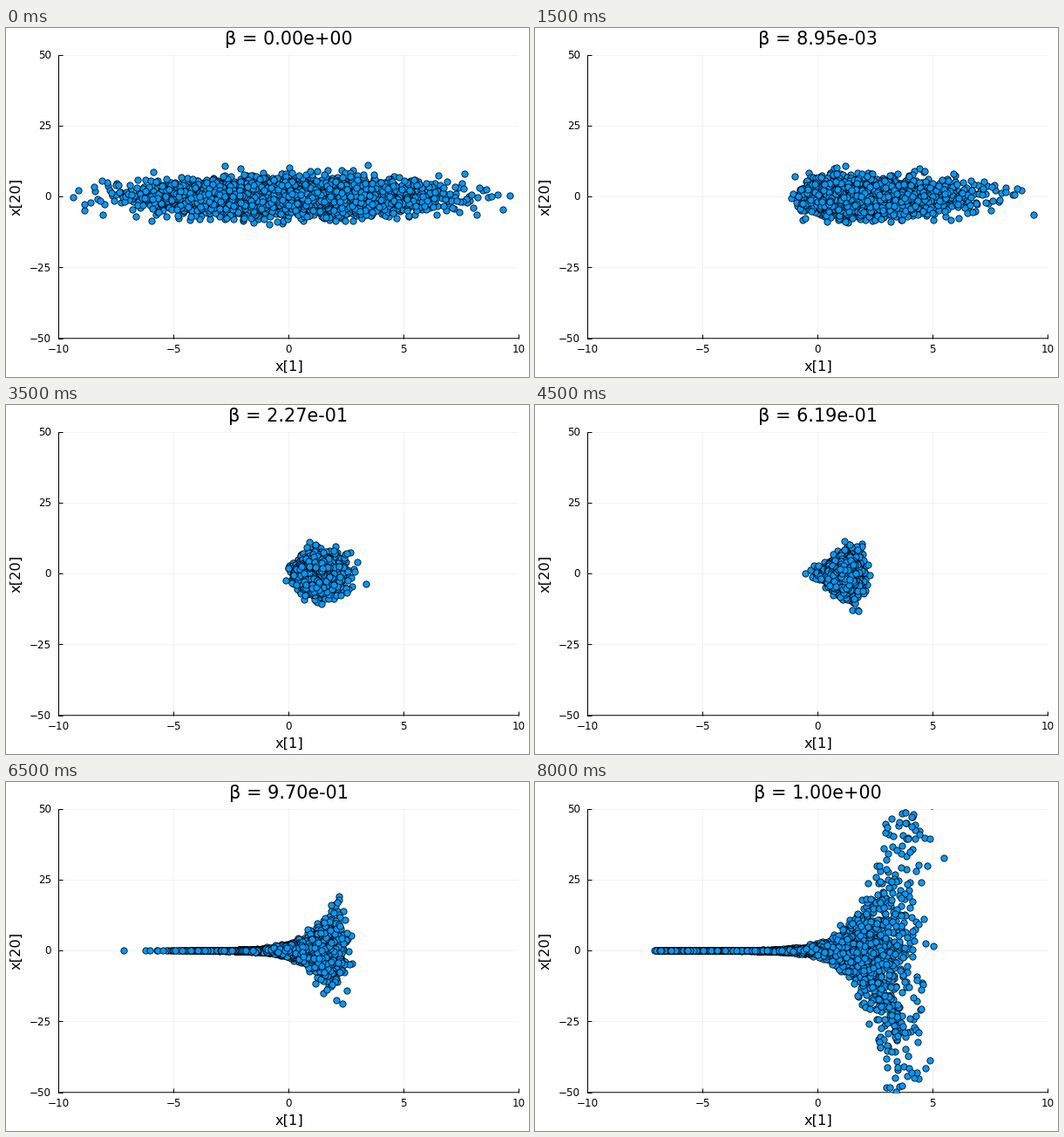
A matplotlib script that plays this animation: 600 by 400 pixels, repeating every 8.5 s.

```python
import numpy as np
import matplotlib.pyplot as plt
from matplotlib.animation import FuncAnimation

W, H, DPI = 600, 400, 100
PX = 72 / DPI
LEFT, RIGHT, TOP, BOTTOM = 60.3, 588.3, 30.6, 355.75
BLUE = "#009AFA"
FRAMES, COUNT, DIM, SIGMA = 17, 3500, 20, 3

# Key points of the annealing schedule, joined by straight lines in logit.
KEY_STEPS = [1, 3, 5, 7, 11, 13, 15, 16]
KEY_BETAS = np.array([1e-4, 8.95e-3, 5.96e-2, 0.227, 0.9, 0.97, 0.994, 0.99997])


def beta_at(step):
    if step == 0:
        return 0.0
    logit = np.interp(step, KEY_STEPS, np.log(KEY_BETAS / (1 - KEY_BETAS)))
    return 1 / (1 + np.exp(-logit))


def precision(x, beta):
    """Precision of x[20] given x[1], between a Gaussian and a funnel."""
    return (1 - beta) / SIGMA**2 + beta * np.exp(-2 * x)


def sample(step):
    """Draw x[1] by inverting its marginal, then x[20] given x[1]."""
    beta = beta_at(step)
    rng = np.random.default_rng(40 + step)
    grid = np.linspace(-9.6 + 2.5 * beta, 9.65, 6000)
    logp = (-grid**2 / (2 * SIGMA**2)
            - (DIM - 1) * (beta * grid + np.log(precision(grid, beta)) / 2))
    cdf = np.cumsum(np.exp(logp - logp.max()))
    u = rng.permutation((np.arange(COUNT) + rng.random(COUNT)) / COUNT)
    x = np.interp(u, cdf / cdf[-1], grid)
    y = rng.standard_normal(COUNT) / np.sqrt(precision(x, beta))
    return x, y


def label(x, y, text, size, ha="center", rotation=0):
    return fig.text(x / W, 1 - y / H, text, fontsize=size * PX, ha=ha,
                    va="baseline", rotation=rotation, rotation_mode="anchor")


def number(v):
    return str(v).replace("-", "\u2212")


plt.rcParams["font.family"] = "DejaVu Sans"
fig = plt.figure(figsize=(W / DPI, H / DPI), dpi=DPI, facecolor="white")
ax = fig.add_axes([LEFT / W, 1 - BOTTOM / H,
                   (RIGHT - LEFT) / W, (BOTTOM - TOP) / H])
x_ticks, y_ticks = range(-10, 11, 5), range(-50, 51, 25)
ax.set(xlim=(-10, 10), ylim=(-50, 50), xticks=x_ticks, yticks=y_ticks)
ax.set_axisbelow(True)
ax.grid(color="black", alpha=0.07, linewidth=0.5)
ax.tick_params(direction="in", length=5 * PX, width=PX,
               labelbottom=False, labelleft=False)
ax.spines[["top", "right"]].set_visible(False)
ax.spines[["left", "bottom"]].set_linewidth(PX)
ax.spines["bottom"].set_snap(False)

for v in x_ticks:
    label(LEFT + (v + 10) * 26.4, 371.5, number(v), 11.9)
for v in y_ticks:
    label(51.8, 197.4 - v * 3.25, number(v), 11.9, ha="right")
label(324.5, 392.6, "x[1]", 16.3)
label(16, 193, "x[20]", 16.3, rotation=90)
title = label(324, 18.6, "", 20.8)

dots, = ax.plot([], [], "o", markersize=7.3 * PX, markerfacecolor=BLUE,
                markeredgecolor="black", markeredgewidth=0.8 * PX, zorder=3)
dots.set_snap(False)
clouds = [sample(i) for i in range(FRAMES)]


def draw(i):
    dots.set_data(*clouds[i])
    title.set_text(f"β = {beta_at(i):.2e}")
    return dots, title


anim = FuncAnimation(fig, draw, frames=FRAMES, interval=500,
                     init_func=lambda: draw(0), repeat=True, repeat_delay=0)
plt.show()
```
